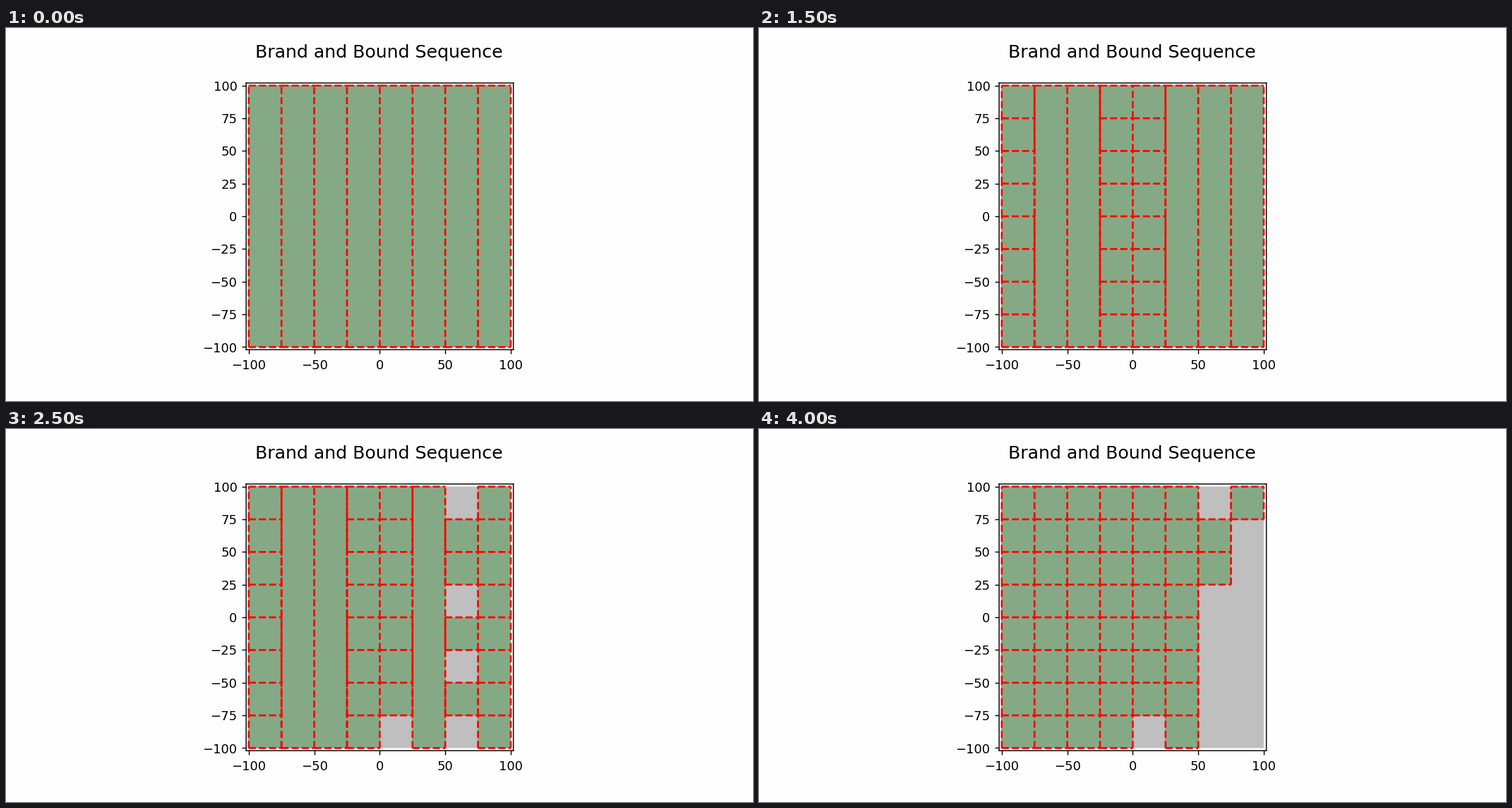
Recreate the animation shown at these times as a matplotlib script. Size 1058x529 px, loop 4.5 s.

```python
import matplotlib.pyplot as plt
from matplotlib.animation import FuncAnimation
from matplotlib.patches import Rectangle

W, H, DPI = 1058, 529, 130
GREEN, GRAY, PAPER = "#86a985", "#bfbfbf", "#fefefe"
N, SIZE, LOW = 8, 25, -100
STEPS = 9

# Column that is divided at each step after the first.
SPLITS = [0, 3, 4, 6, 7, 1, 2, 5]

# Cells (column, row from the bottom) discarded at a step.
PRUNED = {
    4: [(4, 0)],
    5: [(6, r) for r in (0, 2, 4, 7)],
    6: [(6, 1)] + [(7, r) for r in (0, 2, 4, 6)],
    7: [(7, 1), (7, 3)],
    8: [(7, 5), (6, 3)],
}

plt.rcParams["path.snap"] = False

# The small margin keeps the pixel size from rounding down.
fig = plt.figure(figsize=((W + 0.01) / DPI, (H + 0.01) / DPI), dpi=DPI, facecolor=PAPER)
left, right, top, bottom = 340.1, 718.6, 78.0, 456.2
ax = fig.add_axes([left / W, 1 - bottom / H, (right - left) / W, (bottom - top) / H])
ax.set_facecolor(PAPER)
ax.set(xlim=(-102, 102), ylim=(-102, 102),
       xticks=range(-100, 101, 50), yticks=range(-100, 101, 25))
ax.tick_params(labelsize=10)
ax.tick_params(axis="x", pad=4.2)
fig.text(528.6 / W, 1 - 42.3 / H, "Brand and Bound Sequence",
         fontsize=14, ha="center", va="baseline")
ax.add_patch(Rectangle((LOW, LOW), N * SIZE, N * SIZE, color=GRAY, lw=0, zorder=0.5))

artists = []


def boxes(step):
    """Live boxes as (x, y, width, height)."""
    split = set(SPLITS[:step])
    gone = {cell for s in range(step + 1) for cell in PRUNED.get(s, [])}
    for col in range(N):
        x = LOW + col * SIZE
        if col not in split:
            yield x, LOW, SIZE, N * SIZE
            continue
        for row in range(N):
            if (col, row) not in gone:
                yield x, LOW + row * SIZE, SIZE, SIZE


def sides(x, y, w, h):
    """Each side runs left to right or upwards, so shared dashes line up."""
    x2, y2 = x + w, y + h
    return [(x, y, x2, y), (x, y2, x2, y2), (x, y, x, y2), (x2, y, x2, y2)]


def draw(step):
    while artists:
        artists.pop().remove()
    edges = set()
    for x, y, w, h in boxes(step):
        artists.append(ax.add_patch(Rectangle((x, y), w, h, color=GREEN, lw=0,
                                              antialiased=False)))
        edges.update(sides(x, y, w, h))
    for x1, y1, x2, y2 in sorted(edges):
        artists.extend(ax.plot([x1, x2], [y1, y2], "--", color="red", lw=1.5,
                               scalex=False, scaley=False))
    return artists


anim = FuncAnimation(fig, draw, frames=STEPS, interval=500,
                     init_func=lambda: draw(0), repeat=True, repeat_delay=0)
plt.show()
```
